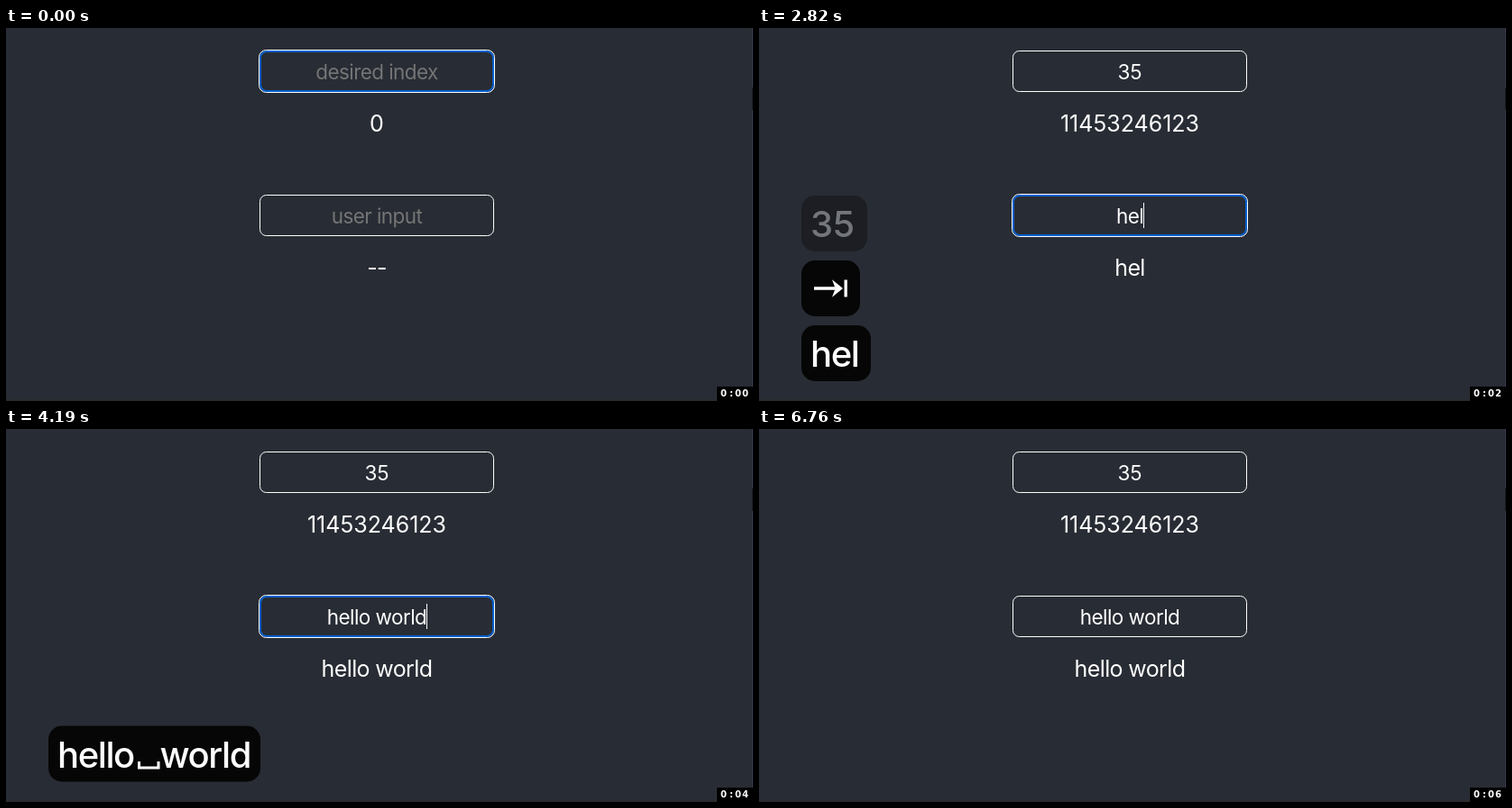
An HTML page that plays this animation: 828 by 414 pixels, repeating every 6.78 s.

```html
<!DOCTYPE html>
<html lang="en">
<head>
<meta charset="utf-8">
<title>Index and input fields</title>
<style>
  html, body { margin: 0; width: 100%; height: 100%; overflow: hidden; background: #282c34; }
  svg { display: block; width: 828px; height: 414px; }
  text { font-family: Inter, "Liberation Sans", sans-serif; font-optical-sizing: none; fill: #fff; white-space: pre; }
  .field { font-size: 22.5px; text-anchor: middle; letter-spacing: -.025em; }
  .result { font-size: 25px; text-anchor: middle; letter-spacing: -.025em; }
  .key { font-size: 40px; font-weight: 500; letter-spacing: -1.4px; }
  .digits { letter-spacing: 0; }
  .hint { fill: #757575; }
  .clock { font: bold 10px "DejaVu Sans", sans-serif; }
  .frame { fill: none; stroke: #fff; }
  .glow { fill: none; stroke: #005fcc; stroke-width: 2; }
  .pill { fill: #060606; }
</style>
</head>
<body>
<svg viewBox="0 0 828 414">
  <defs>
    <g id="plain"><rect class="frame" x="281.5" y="25.5" width="259" height="45" rx="7"/></g>
    <g id="focus">
      <rect class="glow" x="282" y="26" width="258" height="44" rx="7"/>
      <rect class="frame" x="280.5" y="24.5" width="261" height="47" rx="8"/>
    </g>
  </defs>
  <rect width="828" height="414" fill="#282c34"/>
  <rect x="827" width="1" height="414" fill="#373949"/>
  <rect x="827" y="66" width="1" height="25" fill="#15171d"/>
  <rect y="412" width="828" height="2" fill="#2a2b2e"/>

  <use id="box1"/>
  <text id="field1" class="field" x="411" y="57"/>
  <text id="result1" class="result digits" x="411" y="115"/>
  <use id="box2" y="160"/>
  <text id="field2" class="field" x="411" y="217"/>
  <text id="result2" class="result" x="411" y="275"/>
  <rect id="caret" width="1" height="28" fill="#fff"/>

  <g id="numKey">
    <rect class="pill" x="47" height="62" rx="15"/>
    <text class="key digits" x="57" y="46"/>
  </g>
  <g id="tabKey">
    <rect class="pill" x="47" width="65" height="62" rx="15"/>
    <path d="M61 29.3h23l-3-8 12 9.700-12 9.700 3-8H61z M94.500 21.500h3.300v19h-3.300z" fill="#fff"/>
  </g>
  <g id="wordKey">
    <rect class="pill" x="47" height="62" rx="15"/>
    <text id="wordA" class="key" x="57" y="46"/>
    <path id="space" d="M147.500 39.500v7h21.500v-7" fill="none" stroke="#fff" stroke-width="3"/>
    <text id="wordB" class="key" x="170.500" y="46"/>
  </g>

  <rect x="788" y="398" width="40" height="16" fill="#000"/>
  <text id="clock" class="clock" x="792 802 808 816" y="409"/>
</svg>
<script>
const LOOP = 6780;
const $ = id => document.getElementById(id);

// Step tracks: [start ms, value]
const numKeys = [[0, ""], [590, "3"], [890, "35"]];
const indexText = [[0, ""], [740, "3"], [1190, "35"]];
const words = [[0, ""], [2530, "h"], [2680, "he"], [2820, "hel"], [2970, "hell"], [3140, "hello"],
  [3430, "hello w"], [3580, "hello wo"], [3730, "hello worl"], [3870, "hello world"]];
const seconds = [[0, 0], [890, 1], [1930, 2], [2990, 3], [3960, 4], [4960, 5], [5960, 6]];
const focus = [[0, 1], [2080, 2], [6760, 0]];
const caretOn = [[0, 0], [740, 1], [1630, 0], [2080, 1], [4340, 0], [4940, 1], [5400, 0], [6010, 1], [6460, 0]];
const numFade = [[0, 0], [590, 1], [2820, .35], [2970, 0]];
const tabFade = [[0, 0], [1930, 1], [4030, .35], [4180, 0]];
const wordFade = [[0, 0], [2530, 1], [5850, .35], [6010, 0]];

const advance = { 3: 25.5, 5: 25.5, h: 23, e: 22, l: 10, o: 23, w: 30, r: 13, d: 24 };
const width = (s, space) => [...s].reduce((sum, c) => sum + (advance[c] || space), 0);
const at = (track, t) => track.findLast(step => step[0] <= t)[1];
const jacobsthal = n => (2 ** n - (-1) ** n) / 3;

function setField(id, value, hint) {
  const el = $(id);
  el.textContent = value || hint;
  el.classList.toggle("hint", !value);
  el.classList.toggle("digits", /\d/.test(value));
}

function setKey(id, y, opacity) {
  $(id).setAttribute("transform", `translate(0 ${y})`);
  $(id).setAttribute("opacity", opacity);
}

function setPill(id, text) {
  $(id).querySelector("rect").setAttribute("width", 22 + width(text, 25));
}

function draw(t) {
  const index = at(indexText, t), word = at(words, t), num = at(numKeys, t), active = at(focus, t);

  setField("field1", index, "desired index");
  setField("field2", word, "user input");
  $("result1").textContent = jacobsthal(+index);
  $("result2").textContent = word || "--";
  for (const n of [1, 2]) $("box" + n).setAttribute("href", active === n ? "#focus" : "#plain");

  const typed = active === 1 ? index : word;
  $("caret").setAttribute("x", Math.floor(411 + width(typed, 6 / .56) * .56 / 2));
  $("caret").setAttribute("y", active === 1 ? 34 : 194);
  $("caret").setAttribute("opacity", at(caretOn, t));

  const spaced = word.includes(" ");
  const [first, second = ""] = word.split(" ");
  const wordY = spaced ? 329.5 : 330;
  const tabY = t < 2530 ? 330 : spaced ? 256 : 258;
  setKey("numKey", t < 1930 ? 330 : t < 2530 ? 258 : 186, at(numFade, t));
  setKey("tabKey", tabY, at(tabFade, t));
  setKey("wordKey", wordY, at(wordFade, t));
  setPill("numKey", num);
  setPill("wordKey", word);
  $("numKey").querySelector("text").textContent = num;
  $("wordA").textContent = first;
  $("wordB").textContent = second;
  $("space").setAttribute("opacity", spaced ? 1 : 0);

  $("clock").textContent = "0:0" + at(seconds, t);
}

const start = performance.now();
function tick() {
  draw((performance.now() - start) % LOOP);
  requestAnimationFrame(tick);
}
tick();
</script>
</body>
</html>
```
